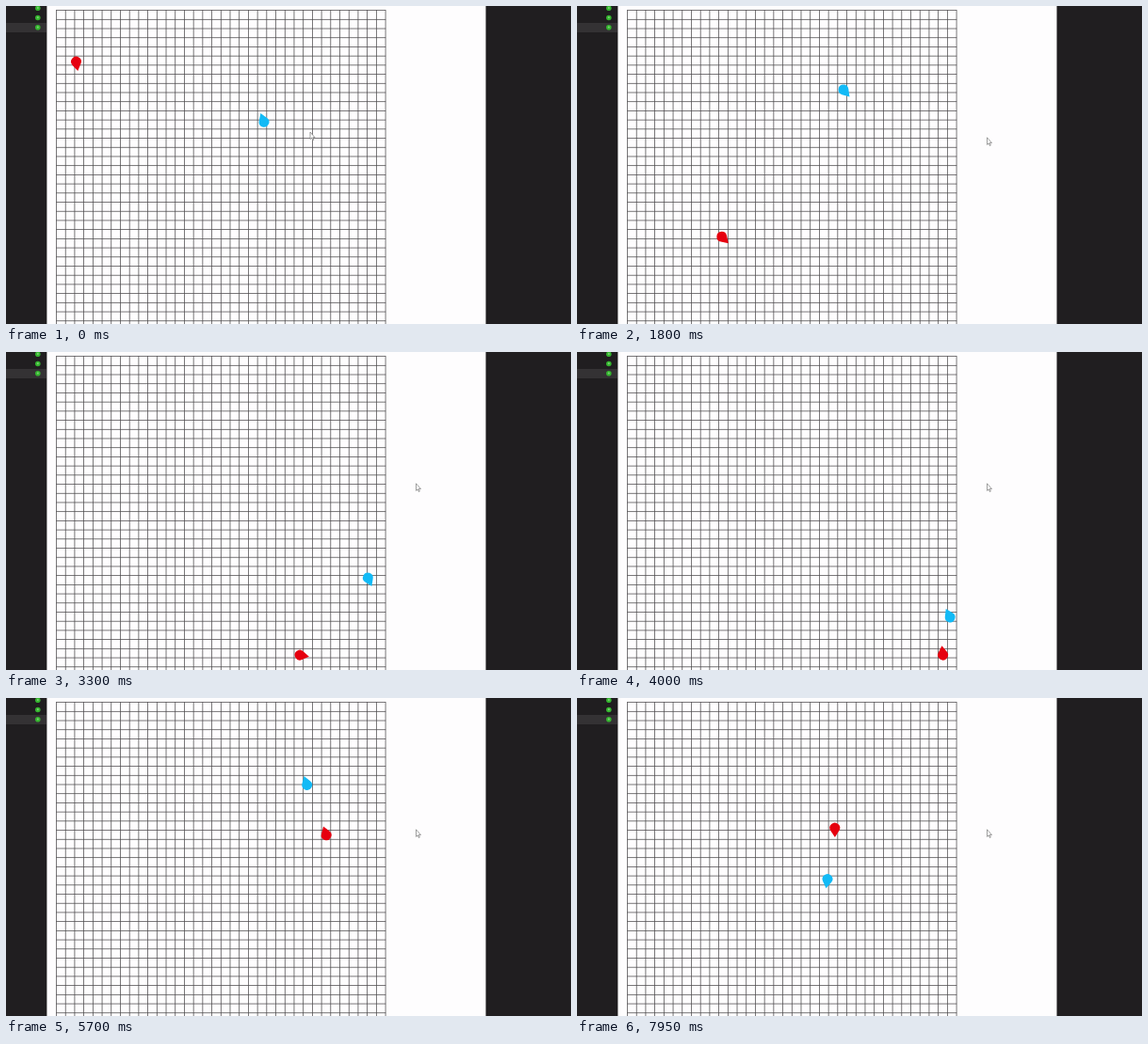
Write an HTML page with a canvas that moves like this. It is 600 by 338 pixels and loops after 8000 ms.

```html
<!DOCTYPE html>
<html lang="en">
<head>
<meta charset="utf-8">
<title>Pursuit on a grid</title>
<style>
  html, body { margin: 0; width: 100%; height: 100%; overflow: hidden; background: #201e20; }
  canvas { display: block; }
</style>
</head>
<body>
<canvas id="stage" width="600" height="338"></canvas>
<script>
const ctx = document.getElementById('stage').getContext('2d');
const LOOP = 8000, STEP = 50;
const TURN = 80;    // half the time a turn takes, in ms
const CELL = 9.71;

// Turning points: time in ms, x, y
const red = [
  [0, 74.5, 59.2], [1150, 98.2, 190.9], [2450, 209.3, 299.6],
  [3300, 312, 322.5], [3930, 390, 329], [4750, 374, 247.8],
  [6350, 317, 76], [6700, 305.5, 49.4], [6930, 278, 38],
  [7220, 273, 66], [7950, 273.8, 138]
];
const blue = [
  [0, 274, 123.3], [965, 228, 6], [1150, 231.9, 29.5],
  [2450, 334, 148.5], [3300, 384.8, 239.8], [3830, 405, 300],
  [4750, 357, 202.3], [6430, 291, 8], [6700, 288.8, 45.3], [7950, 266, 192.5]
];

// Straight legs between turning points, extended past both ends
function onLegs(points, t) {
  let i = 1;
  while (i < points.length - 1 && points[i][0] < t) i++;
  const [t0, x0, y0] = points[i - 1], [t1, x1, y1] = points[i];
  const u = (t - t0) / (t1 - t0);
  return { x: x0 + (x1 - x0) * u, y: y0 + (y1 - y0) * u };
}

// Averaging the legs over a short time rounds the turns
function pose(points, t) {
  const samples = 16;
  let x = 0, y = 0;
  for (let i = 0; i < samples; i++) {
    const p = onLegs(points, t + TURN * ((2 * i + 1) / samples - 1));
    x += p.x / samples;
    y += p.y / samples;
  }
  const from = onLegs(points, t - TURN), to = onLegs(points, t + TURN);
  return { x, y, angle: Math.atan2(to.y - from.y, to.x - from.x) };
}

function rect(color, x, y, w, h) {
  ctx.fillStyle = color;
  ctx.fillRect(x, y, w, h);
}

function dot(color, x, y, r) {
  ctx.fillStyle = color;
  ctx.beginPath();
  ctx.arc(x, y, r, 0, 2 * Math.PI);
  ctx.fill();
}

function drawBackground() {
  rect('#201e20', 0, 0, 600, 338);
  rect('#343234', 0, 18, 43, 10);
  rect('#fefdfe', 43.4, 0, 466.1, 338);
  for (let i = 0; i < 3; i++) {
    dot('#35b52f', 33.8, 2.3 + i * 10.2, 2.8);
    dot('#7fd67a', 33.8, 2.1 + i * 10.2, 1);
  }
  const thickness = 0.75, ink = '#4c4a4c';
  for (let i = 0; i <= 36; i++) {
    rect(ink, 53.5 + i * CELL - thickness / 2, 4.2, thickness, 334);
    rect(ink, 53.2, 4.6 + i * CELL - thickness / 2, 350, thickness);
  }
}

const dropShape = new Path2D('M9.9 0L2.95 4.52A5.4 5.4 0 1 1 2.95 -4.52Z');
const arrowShape = new Path2D('M0 0V7.6L1.7 6.1L2.8 8.7L3.9 8.2L2.8 5.7H5Z');

function drawDrop(points, t, color) {
  const { x, y, angle } = pose(points, t);
  ctx.save();
  ctx.translate(x, y);
  ctx.rotate(angle);
  ctx.fillStyle = color;
  ctx.fill(dropShape);
  ctx.restore();
}

const progress = (t, start, end) => Math.min(1, Math.max(0, (t - start) / (end - start)));

function drawPointer(t) {
  ctx.save();
  ctx.translate(323 + 112.5 * progress(t, 0, 1650), 134 + 5.8 * progress(t, 1150, 1650));
  ctx.fillStyle = '#fff';
  ctx.strokeStyle = '#777';
  ctx.lineWidth = 0.7;
  ctx.fill(arrowShape);
  ctx.stroke(arrowShape);
  ctx.restore();
}

function frame() {
  const t = Math.floor(performance.now() % LOOP / STEP) * STEP;
  drawBackground();
  drawDrop(blue, t, '#12baf6');
  drawDrop(red, t, '#e6000f');
  drawPointer(t);
  requestAnimationFrame(frame);
}
frame();
</script>
</body>
</html>
```
